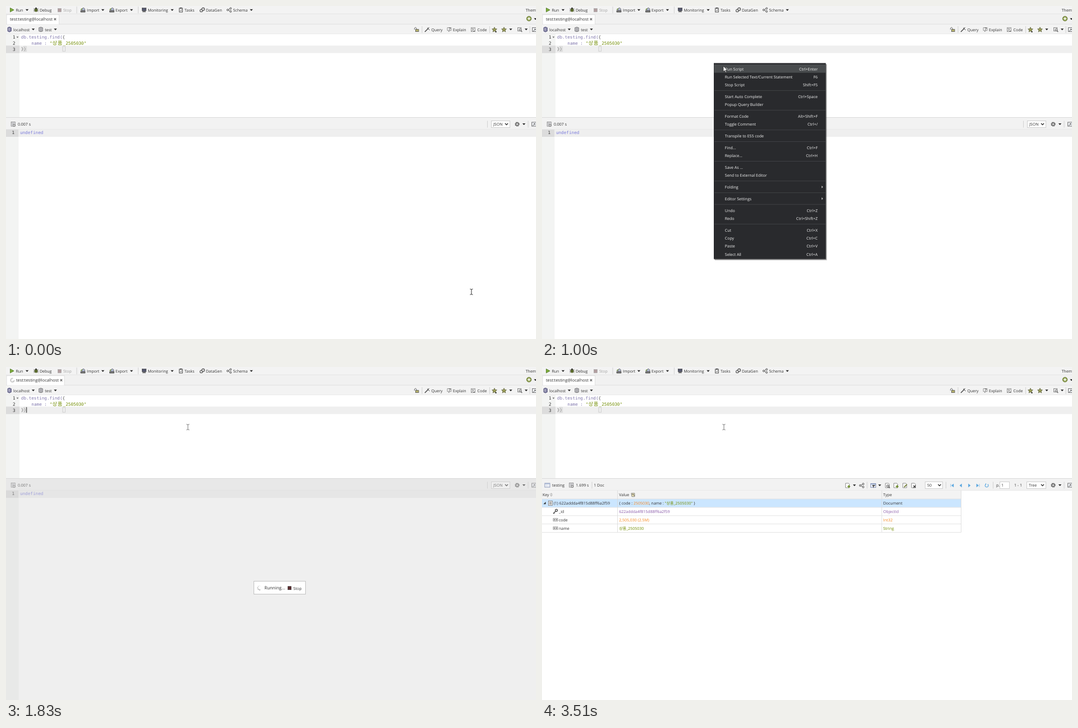
These frames come from a looping animation (944x593 px, 4500 ms). An HTML page:

```html
<!DOCTYPE html>
<html lang="en">
<head>
<meta charset="utf-8">
<title>Query editor</title>
<style>
html, body { margin: 0; width: 100%; height: 100%; overflow: hidden; background: #fff; }
svg { display: block; width: 944px; height: 593px; }
text { font: 7px "Open Sans", "Noto Sans CJK KR", "Noto Sans CJK", sans-serif; text-rendering: geometricPrecision; white-space: pre; fill: #333; }
.tab { font-size: 7.4px; }
.big { font-size: 7.9px; }
.code { font: 7.67px "DejaVu Sans Mono", "Noto Sans CJK KR", "Noto Sans CJK", monospace; }
.ko { font-size: 9px; }
.end { text-anchor: end; }

.menu, .hot, .click, .busy, .idle, .mask, .tree, .plain, .caret, .beam, .arrow { animation: 4.5s step-end infinite; }
.menu { animation-name: menu; }
.hot { animation-name: hot; }
.click { animation-name: click; }
.busy { animation-name: busy; }
.idle { animation-name: idle; }
.mask { animation-name: mask; }
.tree { animation-name: tree; }
.plain { animation-name: plain; }
.caret { animation-name: caret; }
.beam { animation-name: beam, travel; }
.arrow { animation-name: menu, nudge; }
.on { animation: on 4.5s step-end infinite; }
.off { animation: off 4.5s step-end infinite; }
.turn { transform-box: view-box; animation: turn .56s steps(8) infinite; }

@keyframes menu { 0% { visibility: hidden } 14.66% { visibility: visible } 29.77% { visibility: hidden } }
@keyframes hot { 0% { visibility: hidden } 19.11% { visibility: visible } 29.77% { visibility: hidden } }
@keyframes click { 0% { visibility: hidden } 26.66% { visibility: visible } 29.77% { visibility: hidden } }
@keyframes busy { 0% { visibility: hidden } 33.1% { visibility: visible } 73.55% { visibility: hidden } }
@keyframes idle { 0% { visibility: visible } 33.1% { visibility: hidden } 73.55% { visibility: visible } }
@keyframes mask { 0% { visibility: hidden } 33.1% { visibility: visible } 73.55% { visibility: hidden } }
@keyframes tree { 0% { visibility: hidden } 73.55% { visibility: visible } }
@keyframes plain { 0% { visibility: visible } 73.55% { visibility: hidden } }
@keyframes on { 0% { opacity: 1 } 42.21% { opacity: .42 } 77.99% { opacity: 1 } }
@keyframes off { 0% { opacity: .42 } 42.21% { opacity: 1 } 77.99% { opacity: .42 } }
@keyframes caret {
  0%, 22.22%, 48.88%, 71.1% { visibility: hidden }
  11.55%, 37.77%, 60% { visibility: visible }
}
@keyframes beam { 0% { visibility: visible } 14.66% { visibility: hidden } 29.77% { visibility: visible } }
@keyframes travel {
  0% { transform: translate(829px, 509px); opacity: 1 }
  1.55% { transform: translate(829px, 509px); animation-timing-function: steps(4, jump-start) }
  8.66% { transform: translate(308px, 102px); opacity: 1 }
  29.77%, 100% { transform: translate(324px, 107px); opacity: .65 }
}
@keyframes nudge {
  0% { transform: translate(307px, 102px) }
  17.55% { transform: translate(307px, 102px); animation-timing-function: steps(3, jump-start) }
  22.22%, 100% { transform: translate(323px, 107px) }
}
@keyframes turn { to { transform: rotate(360deg) } }
</style>
</head>
<body>
<script>
const text = (x, y, s, cls = '', fill = '') =>
  `<text x="${x}" y="${y}" class="${cls}"${fill && ` style="fill:${fill}"`}>${s}</text>`;
const rect = (x, y, w, h, fill, extra = '') =>
  `<rect x="${x}" y="${y}" width="${w}" height="${h}" fill="${fill}" ${extra}/>`;
const path = (d, fill, stroke = 'none', w = 1) =>
  `<path d="${d}" fill="${fill}" stroke="${stroke}" stroke-width="${w}"/>`;
const dot = (x, y, r, fill, extra = '') => `<circle cx="${x}" cy="${y}" r="${r}" fill="${fill}" ${extra}/>`;
const group = (cls, ...parts) => `<g class="${cls}">${parts.join('')}</g>`;
const at = (x, y, ...parts) => `<g transform="translate(${x} ${y})">${parts.join('')}</g>`;
const frame = (x, y, w, h, stroke, fill = '#fff') => rect(x + .5, y + .5, w - 1, h - 1, fill, `stroke="${stroke}"`);
const drop = (x, y) => path(`M${x - 2.7} ${y - 1.2}h5.4l-2.7 3z`, '#222');
const vline = (x, y) => rect(x, y - 6, 1, 12, '#d2d2d2');

// Small icons, each drawn around its own centre
const icon = {
  play: path('M-3-3.6L3.6 0L-3 3.6z', '#7fae3a', '#47701d', .8),
  bug: path('M-4-2.5L4 3M4-2.5L-4 3M-4.5 .3H4.5', 'none', '#444', .9) + `<ellipse rx="2.6" ry="3.6" fill="#5b6b2c"/>` + dot(0, -3, 1.5, '#333'),
  stop: rect(-3, -3, 6, 6, '#5a2a2d', 'stroke="#333" stroke-width=".6"'),
  tray: path('M-4 1h8v3h-8z', '#777', '#444', .7) + path('M-2 1V-2L1-4L3.5-2V1z', '#aeb7d0', '#555', .7) + path('M-4-.5L-1-2.5', 'none', '#678c2a', 1.3),
  screen: rect(-3.7, -3.5, 7.4, 5, '#55586e', 'stroke="#333" stroke-width=".6"') + path('M-3 3.2H3M0 1V3', 'none', '#444', 1.2),
  task: rect(-2.8, -3.2, 5.6, 7, '#fff', 'stroke="#444"') + rect(-1.5, -4.3, 3, 2, '#444') + path('M-1.3 .5L0 2L1.6-1', 'none', '#444', .8),
  link: dot(-1.7, 1.2, 2.3, 'none', 'stroke="#555" stroke-width="1.2"') + dot(1.6, -1.3, 2.5, '#ddd', 'stroke="#555" stroke-width="1.2"'),
  nodes: path('M-2.5 0L2.5-2.8M-2.5 0L2.5 2.8', 'none', '#555', .9) + [[-2.7, 0], [2.6, -2.7], [2.6, 2.7]].map(p => dot(...p, 1.5, '#eee', 'stroke="#444" stroke-width=".9"')).join(''),
  host: path('M-3-3L0-4.4L3.4-3V3L0 4.5L-3 3z', '#8584a8', '#48486b', .8) + path('M-2-1.2H1M-2 1H1', 'none', '#ddd', .8),
  db: path('M-3.4-3q3.4-2 6.8 0v6q-3.4 2-6.8 0z', '#c9c9d0', '#666', .8) + path('M-1-3.5V4M1.2-3.5V4', 'none', '#777', .7),
  unlock: path('M-3.5 0V-2.5q1.8-3 3.5 0V0', 'none', '#666', 1) + rect(-1.6, -.4, 5.6, 4, '#b5b16c', 'stroke="#555" stroke-width=".8"'),
  wand: path('M-4 4L2-2', 'none', '#444', 1.5) + path('M2-4V0M0-3L5 1M4-4L0 0', 'none', '#555', .8),
  help: path('M-3.5-3.5H3.5V1.7H1L-1 4V1.7H-3.5z', '#eee', '#777', .7) + text(-1.7, 1.6, '?', 'code', '#333'),
  sheet: frame(-4, -4, 8, 8, '#999', '#f4f4f4') + path('M-2.5 2.5L2-2M-2.5-1.5H0M0 2.5H3', 'none', '#555', .9),
  star: path('M0-4.3L1.3-1.4L4.4-1.1L2 1L2.8 4.1L0 2.4L-2.8 4.1L-2 1L-4.4-1.1L-1.3-1.4z', '#9b9d56', '#50522e', .7),
  find: frame(-4, -4, 7, 7, '#888', '#eee') + dot(1, .5, 2, '#ddd', 'stroke="#555" stroke-width=".8"') + path('M2.3 2L4.2 4', 'none', '#555', 1.2),
  gear: dot(0, 0, 3.2, '#bbb', 'stroke="#555" stroke-width="1.8" stroke-dasharray="1.5 1"') + dot(0, 0, 2.6, '#aaa', 'stroke="#555" stroke-width=".7"') + dot(0, 0, 1, '#eee'),
  window: frame(-4, -4, 9, 8, '#777', '#eceef2') + path('M-2 3L2-1M0-1H2V1', 'none', '#555', .9),
  table: frame(-5, -4, 10, 8, '#8996b8', '#fff') + rect(-4, -3, 8, 1.6, '#a9bad8') + path('M-4 1H4M-1-1V3', 'none', '#c8d0e0', .8),
  clock: rect(-3.3, -4, 7, 7.5, '#ececf0', 'stroke="#777" stroke-width=".8"') + path('M-2-2H2M-2 0H2', 'none', '#888', .8) + dot(1.8, 2, 2, '#ddd', 'stroke="#555" stroke-width=".8"'),
  page: path('M-3.3-4H2L3.6-2.4V4H-3.3z', '#fff', '#777', .8),
  key: dot(1.6, -1.7, 2, '#eee', 'stroke="#444" stroke-width="1.2"') + path('M0 0L-4 4M-3 3L-1.7 4', 'none', '#444', 1.3),
  field: rect(-4, -2.3, 8, 4.6, '#eee', 'stroke="#777" stroke-width=".7"') + path('M-2.8 0H-.7M.7 0H2.8', 'none', '#555', 1.6),
};
const put = (name, x, y, extra = '') => at(x, y, icon[name], extra);
const select = (x, w, s, arrow) => frame(x, 204, w, 13, '#cfcfcf') + text(x + 4, 213, s) +
  path(`M${arrow - 2.5} 209l2.5 2.6l2.5-2.6`, 'none', '#222', 1.3);
const plus = path('M0 1.8H5M2.5-.7V4.3', 'none', '#6b8d24', 1.6);

const code = '#8078ad', soft = '#666', olive = '#718c00', orange = '#f5871f', purple = '#8959a8';

const toolbar = rect(0, 0, 944, 14, '#f3f3f3') +
  group('on', put('play', 10.5, 7), text(17.5, 9.7, 'Run'), drop(37.5, 7), put('bug', 53.5, 7), text(60, 9.7, 'Debug')) +
  group('off', put('stop', 95.3, 7.3), text(102, 9.7, 'Stop')) +
  vline(125.5, 7) + put('tray', 137, 7) + text(144, 9.7, 'Import') + drop(172.5, 7) +
  put('tray', 188.5, 7) + text(195, 9.7, 'Export') + drop(223.5, 7) + vline(235, 7) +
  put('screen', 246, 7) + text(252.5, 9.7, 'Monitoring') + drop(296, 7) +
  put('task', 311.5, 7) + text(318, 9.7, 'Tasks') + put('link', 349.5, 7) + text(356, 9.7, 'DataGen') +
  put('nodes', 397.5, 7) + text(404.5, 9.7, 'Schema') + drop(437, 7) + text(925.5, 9.7, 'Them');

const tab = (w, x) => rect(1, 15.5, w, 17.5, '#fff', 'stroke="#dadada" stroke-width=".8"') +
  text(x, 26.2, 'test:testing@localhost', 'tab') +
  path(`M${x + 78.6} 21.7l3.6 3.6m0-3.6l-3.6 3.6`, 'none', '#555', 1.1);

const tabs = rect(0, 14, 944, 19, '#f1f1f1') + rect(0, 13.6, 944, .8, '#e0e0e0') + rect(0, 31.8, 944, .8, '#dcdcdc') +
  group('idle', tab(93.5, 7)) +
  group('busy', tab(103, 18), at(11.5, 23.5, group('turn', path('M0-3.2A3.2 3.2 0 1 1-3.1-.8', 'none', '#888', 1)))) +
  dot(931.5, 22.5, 4.3, '#8d9e4e', 'stroke="#5e6d2d" stroke-width=".7"') + path('M929 22.5h5m-2.5-2.5v5', 'none', '#fff', 1.4) + drop(943, 23);

const connection = rect(0, 33, 944, 17, '#f3f3f3') + rect(0, 49.4, 944, .7, '#e4e4e4') +
  put('host', 6, 41.7) + text(13, 44.5, 'localhost') + drop(48.5, 41.5) +
  put('db', 62, 41.7) + text(69.3, 44.5, 'test') + drop(88, 41.5) +
  put('unlock', 731, 42) + vline(740.5, 42) + put('wand', 750, 42) + text(757.5, 44.5, 'Query') +
  put('help', 789.5, 42) + text(796, 44.5, 'Explain') + put('sheet', 832, 42) + text(839.5, 44.5, 'Code') + vline(861, 42) +
  put('star', 870, 42, path('M1 4H4', 'none', '#333', 1.4)) + put('star', 887, 42) + drop(899, 41.5) +
  put('find', 915, 42) + drop(926.5, 41.5) + vline(932.5, 42) + put('window', 941, 42);

const brace = x => `<rect x="${x}" y="72" width="4.6" height="8.8" fill="none" stroke="#c4c4c4" stroke-width=".7"/>`;
const editor = rect(0, 50, 24, 148, '#f3f4f3') + rect(0, 70.5, 24, 13.3, '#dcdcdc') + rect(24, 70.5, 920, 13.3, '#efefef') +
  [1, 2, 3].map(n => text(16.5, 47.6 + n * 10.65, n, 'code end')).join('') + path('M18.6 54.6h3.8l-1.9 2.3z', '#666') +
  text(26.8, 58, 'db.testing.find(<tspan fill="#555">{</tspan>', 'code', code) +
  text(45.3, 68.6, 'name : ', 'code', code) + text(77.9, 68.6, '"', 'code', olive) +
  text('82.8 92', 68.9, '상품', 'code ko', olive) + text(101.6, 68.6, '_2505030"', 'code', olive) +
  brace(101) + brace(31.6).replace('y="72"', 'y="72"') + text(26.8, 79.4, '})', 'code', soft) +
  group('caret', rect(36.2, 71.5, 1, 10, '#222'));

const header = rect(0, 198, 944, 22, '#f2f2f2') + rect(0, 198, 944, .8, '#d5d5d5') + rect(0, 219.5, 944, .7, '#e1e1e1');
const settings = put('gear', 910.5, 210.5) + drop(922.5, 210.3) + vline(929.5, 210.5) + put('window', 940, 210.5);

const output = put('clock', 12.5, 210.5) + text(21, 213, '0.007 s') + vline(857, 210.5) + select(864, 34, 'JSON', 891.5) + settings +
  rect(0, 220, 22.5, 373, '#f3f4f3') + rect(0, 220, 22.5, 13, '#dcdcdc') + rect(22.5, 220, 921.5, 13, '#efefef') +
  text(15, 228.2, '1', 'code end') + text(24.9, 228.2, 'undefined', 'code', '#7c7cdb');

const spinner = Array.from({ length: 8 }, (_, i) => {
  const a = i * Math.PI / 4;
  return dot((3.6 * Math.cos(a)).toFixed(2), (3.6 * Math.sin(a)).toFixed(2), .8, '#333', `opacity="${Math.max(.04, 1 - i * .21).toFixed(2)}"`);
}).join('');
const running = rect(0, 199, 944, 394, '#d7d7d7', 'opacity=".4"') + frame(441, 381, 93, 24, '#c2c2c2') +
  at(451.8, 393.3, group('turn', spinner)) + text(460.3, 396.3, 'Running...', 'big') +
  put('stop', 505, 393.7) + text(511.8, 396.7, 'Stop');

const pager = (x, d) => path(d, '#5aa7e0', '#5aa7e0', .6).replace('<path', `<path transform="translate(${x} 211)"`);
const results = put('table', 9.5, 210.5) + text(18, 213, 'testing') + put('clock', 52, 210.5) + text(60.3, 213, '1.699 s') +
  vline(88.5, 210.5) + text(92.3, 213, '1 Doc') +
  put('page', 544, 211, plus) + drop(556.5, 210.5) + put('nodes', 569.5, 211) + vline(578.5, 210.5) +
  put('table', 590, 211, path('M-2-1H4L1 2V5z', '#555')) + drop(601.5, 210.5) +
  put('page', 615, 211, dot(1, 1, 2, '#eee', 'stroke="#444"') + path('M2.5 2.5L4.5 4.5', 'none', '#444', 1.2)) +
  put('page', 630, 211, plus) + put('page', 646, 211, path('M-1 3L4-2', 'none', '#7d8844', 1.8)) +
  put('page', 661.5, 211, path('M0 0L4 4M4 0L0 4', 'none', '#333', 1.2)) +
  select(682, 32, '50', 708) + vline(719, 210.5) +
  pager(730.5, 'M-2.5-2.7V2.7M2.5-2.7L-1 0L2.5 2.7z') + pager(746, 'M1.5-2.8L-2 0L1.5 2.8z') +
  pager(761, 'M-1.5-2.8L2 0L-1.5 2.8z') + pager(776.5, 'M2.5-2.7V2.7M-2.5-2.7L1 0L-2.5 2.7z') +
  path('M790.4 208.7a2.9 2.9 0 1 0 3.4 0M790.5 207.3v2.4', 'none', '#5aa7e0', 1.1) + vline(803, 210.5) +
  text(809, 213, 'p.') + frame(815, 204, 18, 13, '#d0d0d0') + text(818, 213, '1') + text(841, 213, '1 - 1') +
  select(863, 35, 'Tree', 891.5) + settings +
  rect(0, 220, 746, 15, '#f3f3f3') + rect(0, 235, 746, 14.8, '#cbe6ff') +
  [234.6, 249.6, 264.4, 279.2, 294].map(y => rect(0, y, 746.5, .8, '#dedede')).join('') +
  [134, 604.7, 746].map(x => rect(x, 220, .8, 74.5, '#d9d9d9')).join('') +
  text(1, 230, 'Key') + path('M14.5 226.7l2-2.2l2 2.2zM14.5 228.3l2 2.2l2-2.2z', '#ccc', '#999', .4) +
  text(137.3, 230, 'Value') + at(162, 227.8, path('M-3-3H3V3H-2z', '#e7dfb2', '#777', .8), path('M-2-1H1L3 2', 'none', '#555', .9)) +
  text(607.7, 230, 'Type') +
  path('M2.5 244.3h4.2v-4.2z', '#333') + rect(11.5, 238.5, 7, 8, '#eee', 'stroke="#777" stroke-width=".8"') + path('M14 240v5m2-5v5', 'none', '#555', .8) +
  text(20.8, 245, '(1) 622addda4f815d88ff6a2f59') +
  text(137.3, 245, `{ code : <tspan fill="${orange}">2505030</tspan>, name : <tspan fill="${olive}">"상품_2505030"</tspan> }`) + text(607.7, 245, 'Document') +
  put('key', 24, 257) + text(30, 260, '_id') + text(137.3, 260, '622addda4f815d88ff6a2f59', '', purple) + text(607.7, 260, 'ObjectId', '', purple) +
  put('field', 24, 272) + text(30, 274.7, 'code') + text(137.3, 274.7, '2,505,030 (2.5M)', '', orange) + text(607.7, 274.7, 'Int32', '', orange) +
  put('field', 24, 287) + text(30, 289.6, 'name') + text(137.3, 289.6, '상품_2505030', '', olive) + text(607.7, 289.6, 'String', '', olive);

// Sections are split by blank entries; "label|shortcut", ">" opens a submenu
const items = `Run Script|Ctrl+Enter;Run Selected Text/Current Statement|F6;Stop Script|Shift+F5;;Start Auto Complete|Ctrl+Space;Popup Query Builder;;
Format Code|Alt+Shift+F;Toggle Comment|Ctrl+/;;Transpile to ES5 code;;Find...|Ctrl+F;Replace...|Ctrl+H;;Save As ...;Send to External Editor;;
Folding|>;;Editor Settings|>;;Undo|Ctrl+Z;Redo|Ctrl+Shift+Z;;Cut|Ctrl+X;Copy|Ctrl+C;Paste|Ctrl+V;Select All|Ctrl+A`.replace(/\n/g, '').split(';');
let y = 112;
const rows = items.map(item => {
  if (!item) {
    y += 6.42;
    return rect(307, y - 11.2, 198, .8, '#45474a');
  }
  const [label, keys = ''] = item.split('|');
  const row = text(325.8, y + 2.6, label, '', '#f2f2f2') + (keys === '>'
    ? path(`M498 ${y - 2.5}l2.6 2.3l-2.6 2.3z`, '#bbb')
    : text(491, y + 2.6, keys, 'end', '#f2f2f2'));
  y += 14.33;
  return row;
}).join('');
const menu = rect(308, 104, 199.5, 349, '#000', 'opacity=".2"') + rect(307, 103, 199.5, 348.8, '#000', 'opacity=".35"') +
  rect(306, 101.6, 199.5, 349, '#292a2d') + group('hot', rect(306.5, 104, 198.5, 14.8, '#494c4e')) + rows;

const pointers = group('click', dot(322, 107, 7.2, '#d2c40c', 'opacity=".88"')) +
  group('beam', path('M-2.6-5Q0-5 0-3.8Q0-5 2.6-5M0-4V4M-2.6 5Q0 5 0 3.8Q0 5 2.6 5', 'none', '#333', 1)) +
  group('arrow', path('M0 0V10L2.3 7.8L4 11.6L5.5 10.9L3.9 7.3H7z', '#fff', '#222', .7));

document.body.innerHTML = `<svg viewBox="0 0 944 593">${[
  rect(0, 0, 944, 593, '#fff'), toolbar, tabs, connection, editor, header,
  group('plain', output), group('mask', running), group('tree', results), group('menu', menu), pointers,
].join('')}</svg>`;
</script>
</body>
</html>
```
